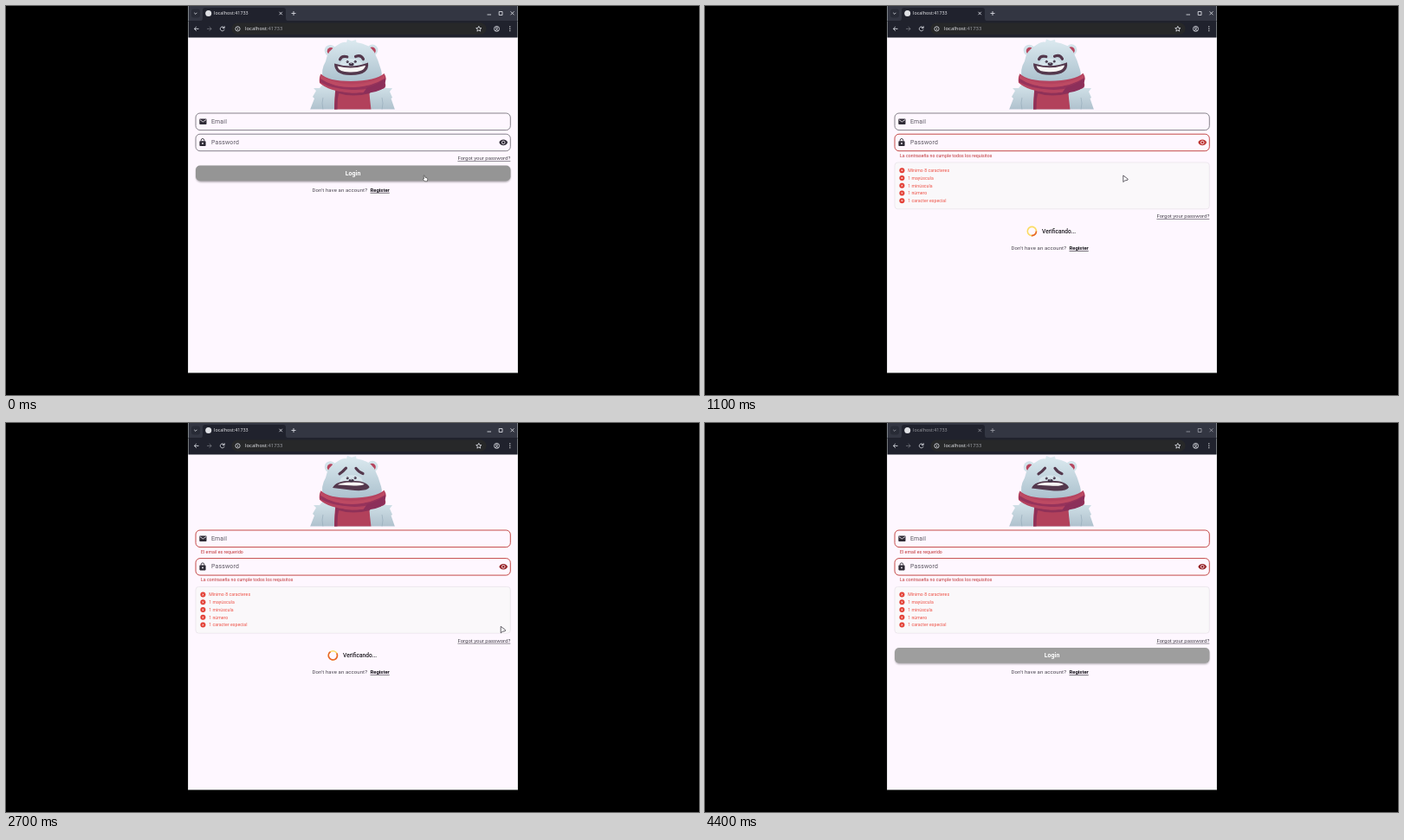
Recreate the animation shown at these times as an HTML page. Size 800 by 450 pixels, loop 4.5 s.

```html
<!DOCTYPE html>
<html lang="es">
<head>
<meta charset="utf-8">
<title>Login</title>
<style>
html, body { margin: 0; width: 100%; height: 100%; overflow: hidden; background: #000; }
svg { display: block; width: 800px; height: 450px; }
text { font-family: Roboto, sans-serif; white-space: pre; }
.ui { font-family: "Noto Sans", sans-serif; fill: #e3e4e8; }
.line { fill: none; stroke: #d5d7de; stroke-width: .9; }
.label { font-size: 6.9px; letter-spacing: .2px; fill: #5a5660; }
.small { font-size: 5.16px; letter-spacing: .05px; }
.body { font-size: 6px; fill: #49454f; }
</style>
</head>
<body>
<svg viewBox="0 0 800 450">
  <defs>
    <linearGradient id="fur" x1="0" y1="0" x2="0" y2="1">
      <stop offset="0" stop-color="#dceaf0"/><stop offset="1" stop-color="#a9bfcc"/>
    </linearGradient>
    <linearGradient id="coat" x1="0" y1="0" x2="0" y2="1">
      <stop offset="0" stop-color="#d6e6ec"/><stop offset="1" stop-color="#afc1cd"/>
    </linearGradient>
    <filter id="blur" x="-5%" y="-50%" width="110%" height="200%"><feGaussianBlur stdDeviation="1.3"/></filter>
    <clipPath id="page"><rect x="210.5" y="36.5" width="380" height="83"/></clipPath>
    <clipPath id="pill"><rect x="219" y="184.5" width="363.5" height="17.7" rx="5"/></clipPath>
  </defs>
  <rect width="800" height="450"/>
  <rect x="210" y="0" width="381" height="424.5" fill="#c9cfcd"/>
  <rect x="210.5" y="36" width="380" height="388" fill="#fef7ff"/>

  <!-- browser chrome -->
  <rect x="210.5" width="380" height="18" fill="#333642"/>
  <rect x="210.5" y="17" width="380" height="19.5" fill="#20222d"/>
  <path d="M224 17.5Q227 17 227 14V5Q227 2 230 2H320Q323 2 323 5V14Q323 17 326 17.5Z" fill="#20222d"/>
  <rect x="260.5" y="19.5" width="294" height="13.5" rx="6.7" fill="#272829"/>
  <rect x="214" y="3.5" width="10" height="10" rx="3" fill="#282b36"/>
  <g id="strip">
    <path class="line" d="M217.2 7.8l1.6 1.6 1.6-1.6M315.5 6.8l3.4 3.4m0-3.4l-3.4 3.4M332 6v5m-2.5-2.5h5"/>
    <path class="line" d="M555.5 10h4.5M569.2 6.5h3.8v4h-3.8zM582.5 6.3l4 4m0-4l-4 4"/>
    <text class="ui" x="240" y="10.4" font-size="5.4">localhost:41733</text>
  </g>
  <circle cx="233.7" cy="8.5" r="3.5" fill="#dfe1e5"/>
  <path class="line" d="M222.5 26.4h-5m2.3-2.4l-2.4 2.4 2.4 2.4"/>
  <path class="line" d="M232 26.4h5m-2.3-2.4l2.4 2.4-2.4 2.4" opacity=".4"/>
  <path class="line" d="M251.8 25.2a2.4 2.4 0 1 0 .2 2M252.2 23.3v2.2h-2.2"/>
  <circle class="line" cx="267.5" cy="26.4" r="2.6"/><path class="line" d="M267.5 26v1.6M267.5 24.7v.5"/>
  <text class="ui" x="276" y="28.4" font-size="5.9">localhost<tspan fill="#9b9da3">:41733</tspan></text>
  <path class="line" d="M545.8 23.4l.9 2 2.2.2-1.7 1.4.5 2.2-1.9-1.2-1.9 1.2.5-2.2-1.7-1.4 2.2-.2z" stroke-width=".7"/>
  <g class="line"><circle cx="566.5" cy="26.4" r="3"/><circle cx="566.5" cy="25.6" r="1"/><path d="M564.5 28.5q2-1.6 4 0"/></g>
  <path d="M581.8 24v.1m0 2.2v.1m0 2.2v.1" stroke="#e3e4e8" stroke-width="1.3" stroke-linecap="round"/>

  <!-- bear -->
  <g clip-path="url(#page)">
    <path d="M351 120L356 107 354 105 358 98 355 95 362 95 367 89H433L439 95 446 95 443 99 446 106 444.5 107 449 120Z" fill="url(#coat)"/>
    <path d="M366 120Q364 112 366 106M434 120Q436 112 434 106" fill="none" stroke="#98adbb" stroke-width=".7"/>
    <g id="head">
      <circle cx="374.3" cy="51.5" r="6.6" fill="#d3e3ea"/><circle cx="375" cy="52.3" r="4.2" fill="#b6455e"/>
      <circle cx="423" cy="51" r="6.4" fill="#d3e3ea"/><circle cx="422.6" cy="51.8" r="4.2" fill="#b6455e"/>
      <path d="M366 85Q363 74 369 64 371 51 383 45 389 41 393 42L394 38.5 399 40.5 404 39 404.5 42Q419 44 425 53 430 63 433 74 435 81 432 86 399 96 366 85Z" fill="url(#fur)"/>
      <ellipse cx="398.5" cy="68" rx="13" ry="7" fill="#e3eff3" opacity=".6"/>
      <path data-a="M379 66.5Q399 73 418 65.5Q420 80 398.5 80Q379 80.5 379 66.5Z"
            data-b="M377 76Q380 67.5 398 67.5Q416 67 420 75Q417 80.5 398 78.5Q381 81 377 76Z" fill="#54384d"/>
      <path data-a="M382.5 69.5Q399 74 415 68.8Q414 76.5 398.5 76.5Q384 77 382.5 69.5Z"
            data-b="M383 72.3Q386 69.5 398 69.3Q410 69 414 71.5Q411 74 398 73Q386 75 383 72.3Z" fill="#f6f5f4"/>
      <path data-a="M385.5 61.8Q387.5 57.3 393.8 58.8" data-b="M385 59.5Q388.5 57.5 392.5 52.8" class="brow"/>
      <path data-a="M403.5 58.5Q410 56 412.5 61.5" data-b="M404 53Q407 57.5 412 59.3" class="brow"/>
      <ellipse cx="398.6" cy="67.3" rx="3" ry="1.9" fill="#3f3044"/>
      <circle cx="394.2" cy="64.6" r="1.5" fill="#3f3044"/><circle cx="403.2" cy="64.3" r="1.5" fill="#3f3044"/>
      <path d="M393.8 64.2v.1m9-.3v.1m-4.9 2.3h1" stroke="#dce8ee" stroke-width=".7" stroke-linecap="round"/>
    </g>
    <path d="M380.5 95H419Q420 108 421.5 120H379Q379 106 380.5 95Z" fill="#b2415b"/>
    <path d="M380.5 96H385Q382 108 382.5 120H379ZM385 98Q400 104 420 97L420.3 101Q400 106 384 101Z" fill="#8f3158"/>
    <g id="scarf">
      <path d="M363.5 78.5Q372 87 398 87 427 86.5 436.5 78 440.5 84 437 89 440 92 436 95.5 420 101.5 397 100 373 99 362 89 361 83 363.5 78.5Z" fill="#b5435f"/>
      <path d="M363 83Q378 95 402 94 424 93 438 82L437.5 88Q421 98 399 97 376 96 362.5 88Z" fill="#96335b"/>
      <path d="M364 81Q381 91 401 90.5 425 89.5 436.5 80L437.5 83.5Q423 93 401 94 377 94 363 84Z" fill="#bd4a63"/>
      <path d="M417 94Q429 91 438 84L437.5 94Q428 101 412 101Z" fill="#8c2f5a"/>
    </g>
  </g>

  <!-- form -->
  <rect id="emailBox" x="219" y="124" width="363.3" height="19.6" rx="5" fill="none" stroke-width=".9"/>
  <path d="M224 130.4h6.8q.7 0 .7.7v5.2q0 .7-.7.7h-6.8q-.7 0-.7-.7v-5.2q0-.7.7-.7z" fill="#2f2b36"/>
  <path d="M223.8 131.6l3.6 2.3 3.6-2.3" fill="none" stroke="#fef7ff" stroke-width=".8"/>
  <text class="label" x="237" y="136">Email</text>
  <text id="emailError" class="small" x="225" y="150.6" fill="#bf3030">El email es requerido</text>

  <g id="password">
    <rect id="passBox" x="219" y="148.2" width="363.3" height="19.5" rx="5" fill="none" stroke-width=".9"/>
    <path d="M224.2 156.2h5.6q.8 0 .8.8v4.2q0 .8-.8.8h-5.6q-.8 0-.8-.8V157q0-.8.8-.8z" fill="#2f2b36"/>
    <path d="M225.2 156.4v-1.1a1.8 1.8 0 0 1 3.6 0v1.1" fill="none" stroke="#2f2b36" stroke-width=".9"/>
    <circle cx="227" cy="159" r=".9" fill="#fef7ff"/>
    <text class="label" x="237" y="160.1">Password</text>
    <g id="eye">
      <path d="M569.3 157.9Q571 154.6 574.2 154.6T579.1 157.9Q577.4 161.2 574.2 161.2T569.3 157.9Z"/>
      <circle cx="574.2" cy="157.9" r="1.8" fill="none" stroke="#fef7ff" stroke-width=".8"/>
    </g>
    <g id="rules">
      <text class="small" x="225" y="174.6" fill="#bf3030">La contraseña no cumple todos los requisitos</text>
      <rect x="219" y="181" width="363.3" height="53.8" rx="3.5" fill="#faf8fa" stroke="#e7e1e8" stroke-width=".7"/>
    </g>
  </g>

  <g id="tail">
    <text class="body" x="582.3" y="178.2" text-anchor="end" text-decoration="underline">Forgot your password?</text>
    <g id="button">
      <rect id="shadow" x="219.5" y="186" width="362.5" height="17.5" rx="5" fill="#000" filter="url(#blur)"/>
      <rect id="face" x="219" y="184.5" width="363.5" height="17.7" rx="5"/>
      <g clip-path="url(#pill)"><circle id="ripple" cy="193.3" fill="#fff" opacity=".13"/></g>
      <text x="400.6" y="195.9" text-anchor="middle" font-size="7" font-weight="600" fill="#fff">Login</text>
    </g>
    <g id="busy">
      <circle cx="377.4" cy="193.3" r="5.1" fill="none" stroke="#fbdc62" stroke-width="1.6"/>
      <circle id="arc" cx="377.4" cy="193.3" r="5.1" fill="none" stroke="#e8622c" stroke-width="1.6" pathLength="360"/>
      <text x="389" y="195.6" font-size="6.6" font-weight="500" fill="#1d1b20">Verificando...</text>
    </g>
    <text class="body" x="353.5" y="214.9" letter-spacing=".1">Don't have an account?</text>
    <text x="420.5" y="214.9" font-size="5.9" font-weight="700" fill="#15131a" text-decoration="underline">Register</text>
  </g>

  <!-- pointers -->
  <path id="arrow" d="M0 0V7.6L1.9 6 5.2 5.2 5.4 4.2Z" fill="#fff" stroke="#3a3740" stroke-width=".8" stroke-linejoin="round"/>
  <path id="hand" d="M482.2 196q.9-.5 1.2.4l.6 2 1.9.6q.9.3.8 1.4l-.4 2.4h-3l-2-2.6q.2-.8 1.2-.2z" fill="#fff" stroke="#333" stroke-width=".6"/>
</svg>
<script>
const LOOP = 4500, REJECT = 550, RECHECK = 2550, DONE = 3950, BLUR = 4300;
const $ = id => document.getElementById(id);
const set = (el, attrs) => { for (const k in attrs) el.setAttribute(k, attrs[k]); };
const show = (id, on) => set($(id), { visibility: on ? 'visible' : 'hidden' });
const shift = (id, x, y) => set($(id), { transform: `translate(${x} ${y})` });
const clamp = v => Math.min(1, Math.max(0, v));
const lerp = (a, b, p) => a + (b - a) * p;
const ramp = (t, from, to) => { const p = clamp((t - from) / (to - from)); return p * p * (3 - 2 * p); };
const color = (a, b, p) => `rgb(${a.map((v, i) => Math.round(lerp(v, b[i], p)))})`;
const morph = (a, b, p) => {
  const goal = b.match(/[\d.]+/g);
  let i = 0;
  return a.replace(/[\d.]+/g, n => lerp(+n, +goal[i++], p).toFixed(2));
};
// Piecewise linear value through [time, ...values] stops
const along = (stops, t) => {
  const i = stops.findIndex(s => s[0] >= t);
  if (i < 0) return stops[stops.length - 1].slice(1);
  if (i === 0) return stops[0].slice(1);
  const [a, b] = [stops[i - 1], stops[i]];
  return a.slice(1).map((v, k) => lerp(v, b[k + 1], (t - a[0]) / (b[0] - a[0])));
};

const POINTER = [[1250, 482.8, 196], [1800, 559, 226], [2200, 571.2, 235.3], [3100, 571.2, 235.3], [3450, 578, 232]];
// time, start angle, sweep
const SPIN = [[550, -90, 10], [1100, 0, 95], [1650, 230, 260], [2200, 500, 95], [2700, 690, 265], [3150, 890, 180], [3600, 1100, 85], [4000, 1260, 240]];
const GRAY = [121, 116, 126], RED = [190, 55, 52], DARK = [47, 43, 54];
const faces = [...document.querySelectorAll('[data-a]')];
document.querySelectorAll('.brow').forEach(el =>
  set(el, { fill: 'none', stroke: '#54384d', 'stroke-width': 3.2, 'stroke-linecap': 'round' }));

['Mínimo 8 caracteres', '1 mayúscula', '1 minúscula', '1 número', '1 caracter especial'].forEach((rule, i) => {
  const y = 190.2 + i * 8.75;
  $('rules').insertAdjacentHTML('beforeend',
    `<circle cx="227.4" cy="${y}" r="3" fill="#e23a30"/>
     <path d="M226.3 ${y - 1.1}l2.2 2.2m0-2.2l-2.2 2.2" stroke="#fff" stroke-width=".7"/>
     <text class="small" x="234.2" y="${y + 1.9}" fill="#ee5045">${rule}</text>`);
});

function draw(t) {
  const rejected = t >= REJECT, rechecked = t >= RECHECK, busy = rejected && t < DONE;
  const sad = ramp(t, 2480, 2720);
  const breath = Math.sin(t / LOOP * Math.PI * 6);

  faces.forEach(el => set(el, { d: morph(el.dataset.a, el.dataset.b, sad) }));
  shift('head', 0, breath * .25 - sad * .5);
  shift('scarf', 0, breath * .15);

  const down = rechecked ? 8.4 : 0;
  set($('emailBox'), { stroke: color(GRAY, RED, ramp(t, RECHECK - 20, RECHECK + 110)) });
  set($('passBox'), { stroke: color(GRAY, RED, ramp(t, REJECT, REJECT + 180)) });
  set($('eye'), { fill: color(DARK, rechecked ? [150, 35, 38] : RED, ramp(t, REJECT, REJECT + 180)) });
  show('emailError', rechecked);
  show('rules', rejected);
  shift('password', 0, down);
  shift('tail', 0, rejected ? 67.2 + down : 0);

  show('button', !busy);
  show('busy', busy);
  const press = ramp(t, 300, 480), pressed = !rejected && t > 300;
  set($('face'), { fill: rejected ? '#9e9e9e' : color([149, 149, 149], [159, 159, 159], press) });
  set($('shadow'), { opacity: rejected ? .3 : lerp(.38, .5, press) });
  const grow = clamp((t - 350) / 150);
  set($('ripple'), { cx: 483 - 16.5 * grow, r: pressed ? 81 * grow : 0 });

  const [start, sweep] = along(SPIN, t);
  set($('arc'), { 'stroke-dasharray': `${sweep} ${360 - sweep}`, transform: `rotate(${start} 377.4 193.3)` });

  show('hand', !rejected);
  show('arrow', rejected && t < 3450);
  shift('arrow', ...along(POINTER, t));
  set($('strip'), { opacity: t >= BLUR ? .6 : 1 });
}

const origin = performance.now();
function tick() {
  draw((performance.now() - origin) % LOOP);
  requestAnimationFrame(tick);
}
tick();
</script>
</body>
</html>
```
